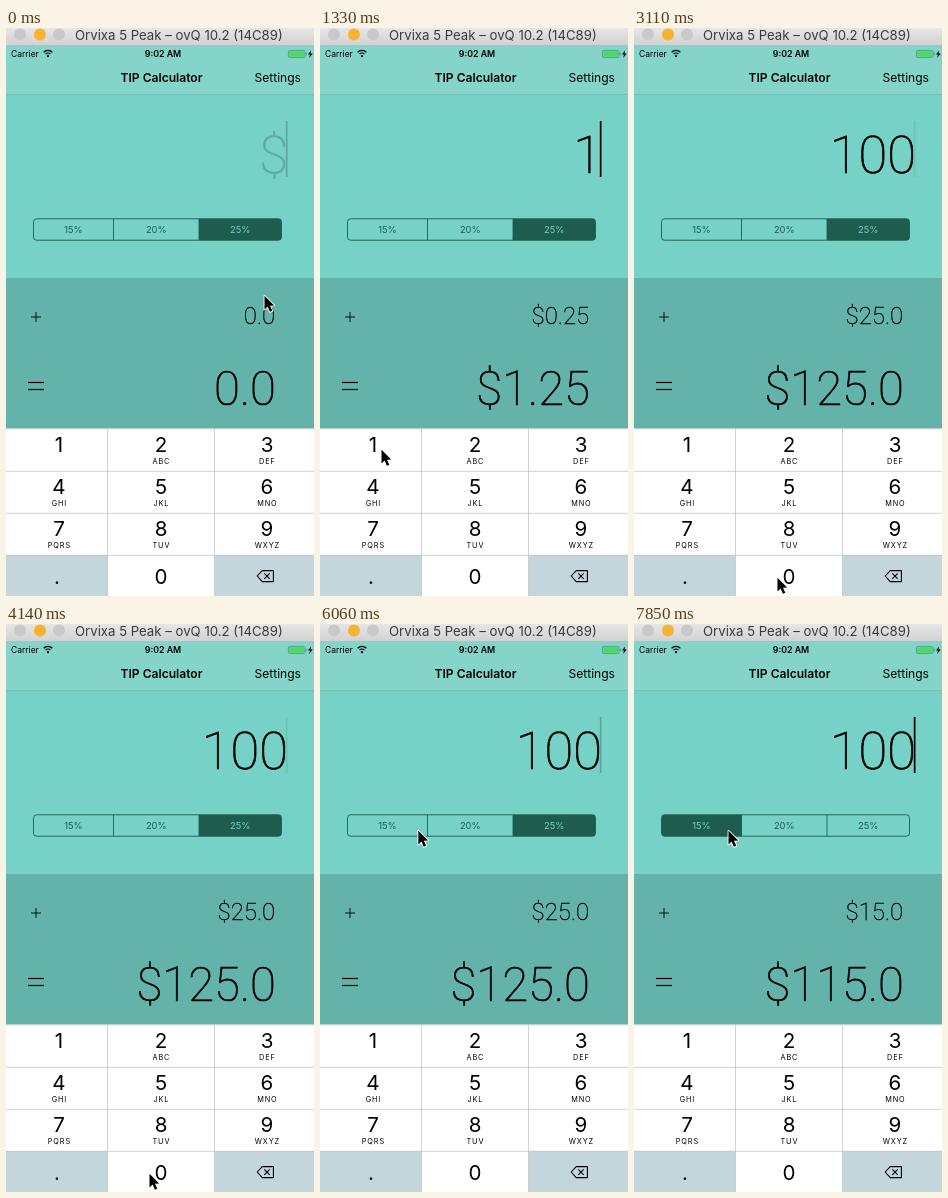
These frames come from a looping animation (308x568 px, 8000 ms). An HTML page with a canvas:

```html
<!DOCTYPE html>
<html lang="en">
<head>
<meta charset="utf-8">
<title>TIP Calculator</title>
<style>
  html, body { margin: 0; width: 100%; height: 100%; overflow: hidden; background: #76d2c7; }
  canvas { display: block; width: 308px; height: 568px; }
</style>
</head>
<body>
<canvas id="stage"></canvas>
<script>
const W = 308, H = 568, LOOP = 8000, STEP = 148.15;
const UI = 'Inter, "Open Sans", sans-serif';
const THIN = 'Roboto, Inter, sans-serif';
const INK = '#000', TEAL = '#76d2c7', LOW = '#64b3ab', DARK = '#1e5c4e', KEY = '#c2d6db';

const canvas = document.getElementById('stage');
const ctx = canvas.getContext('2d');
const dpr = window.devicePixelRatio || 1;
canvas.width = W * dpr;
canvas.height = H * dpr;

// time, x, y of the pointer tip
const PATH = [
  [130, 258, 267], [1040, 61, 421], [1333, 61, 421], [1900, 143, 549],
  [4740, 143, 549], [5037, 125, 230], [5620, 99, 206], [5926, 99, 206],
  [6700, 87, 206], [7700, 87, 206], [7852, 94, 206]
];
const COLS = [0, 101.5, 208.5, W];
const ROWS = [400.5, 443, 485, 527, H];
const CENTERS = [53, 155, 261];
const LETTERS = ['', 'ABC', 'DEF', 'GHI', 'JKL', 'MNO', 'PQRS', 'TUV', 'WXYZ'];
const SEGMENTS = [[27.5, 107.5, 15], [107.5, 193, 20], [193, 275.5, 25]];

function rect(x, y, w, h, fill) {
  ctx.fillStyle = fill;
  ctx.fillRect(x, y, w, h);
}

function disc(x, y, r, fill) {
  ctx.fillStyle = fill;
  ctx.beginPath();
  ctx.arc(x, y, r, 0, Math.PI * 2);
  ctx.fill();
}

function line(points, color, width) {
  ctx.strokeStyle = color;
  ctx.lineWidth = width;
  ctx.beginPath();
  points.forEach(([x, y], i) => i ? ctx.lineTo(x, y) : ctx.moveTo(x, y));
  ctx.stroke();
}

function shape(points) {
  ctx.beginPath();
  points.forEach(([x, y]) => ctx.lineTo(x, y));
  ctx.closePath();
}

function label(text, x, y, size, { align = 'center', color = INK, weight = 400, spacing = 0 } = {}) {
  ctx.font = `${weight} ${size}px ${UI}`;
  ctx.letterSpacing = spacing + 'px';
  ctx.textAlign = align;
  ctx.fillStyle = color;
  ctx.fillText(text, x, y);
  ctx.letterSpacing = '0px';
}

// hairline numerals, right aligned
function amount(text, x, y, size, color = INK) {
  ctx.font = `100 ${size}px ${THIN}`;
  ctx.textAlign = 'right';
  ctx.fillStyle = ctx.strokeStyle = color;
  ctx.lineWidth = size * 0.014;
  ctx.lineJoin = 'round';
  ctx.fillText(text, x, y);
  ctx.strokeText(text, x, y);
}

const money = v => '$' + (Number.isInteger(v) ? v.toFixed(1) : v);

function pointerAt(t) {
  const i = PATH.findIndex(p => p[0] > t);
  if (i === 0) return PATH[0].slice(1);
  if (i < 0) return PATH[PATH.length - 1].slice(1);
  const [t0, x0, y0] = PATH[i - 1], [t1, x1, y1] = PATH[i];
  const u = (t - t0) / (t1 - t0), e = u * u * (3 - 2 * u);
  return [x0 + (x1 - x0) * e, y0 + (y1 - y0) * e];
}

// blinking, held solid while typing
function caretAlpha(t) {
  if (t > 1150 && t < 2930) return 1;
  const p = (t < 1150 ? t + 130 : t - 2930) % 1005;
  if (p < 480) return Math.max(0.08, 1 - p / 165);
  return Math.min(1, 0.08 + (p - 480) / 120);
}

function drawTop() {
  const bar = ctx.createLinearGradient(0, 0, 0, 17);
  bar.addColorStop(0, '#e6e6e6');
  bar.addColorStop(1, '#d2d2d2');
  rect(0, 0, W, 17, bar);
  disc(14, 6.5, 6, '#c9c9c9');
  disc(34, 6.5, 6, '#f7b32d');
  disc(53, 6.5, 6, '#c9c9c9');
  label('Orvixa 5 Peak – ovQ 10.2 (14C89)', 69, 12.2, 13.2, { align: 'left', color: '#3b3b3b' });

  rect(0, 17, W, 49, '#84d4ca');
  rect(0, 66, W, 1, '#73c2b8');
  label('Carrier', 5, 28.8, 8.5, { align: 'left' });
  disc(42, 28.2, 1.1, INK);
  ctx.strokeStyle = INK;
  ctx.lineWidth = 1.3;
  for (const r of [3.5, 6.2]) {
    ctx.beginPath();
    ctx.arc(42, 28.6, r, -Math.PI * 0.75, -Math.PI * 0.25);
    ctx.stroke();
  }
  label('9:02 AM', 157, 28.8, 8.8, { weight: 600 });
  ctx.strokeStyle = '#3f8f7c';
  ctx.lineWidth = 0.7;
  ctx.beginPath();
  ctx.roundRect(282.4, 22.4, 16.6, 7.2, 1.5);
  ctx.stroke();
  rect(283.2, 23.2, 15, 5.6, '#4cd964');
  rect(299.6, 24.7, 1, 2.6, '#3f8f7c');
  shape([[305, 22.5], [302, 26.6], [304, 26.6], [303.2, 30], [306.6, 25.4], [304.5, 25.4]]);
  ctx.fillStyle = INK;
  ctx.fill();

  label('TIP Calculator', 155.5, 54, 12.1, { weight: 600 });
  label('Settings', 295, 54, 12.1, { align: 'right' });
}

function drawSegments(selected, pressed) {
  ctx.save();
  ctx.beginPath();
  ctx.roundRect(27.5, 190.8, 248, 21.4, 3);
  ctx.clip();
  for (const [a, b, pct] of SEGMENTS) {
    if (pct === selected) rect(a, 190, b - a, 23, DARK);
    else if (pct === pressed) rect(a, 190, b - a, 23, 'rgba(30,92,78,0.15)');
  }
  ctx.restore();
  ctx.strokeStyle = DARK;
  ctx.lineWidth = 0.9;
  ctx.beginPath();
  ctx.roundRect(27.5, 190.8, 248, 21.4, 3);
  ctx.stroke();
  for (const x of [107.5, 193]) line([[x, 191], [x, 212]], DARK, 0.9);
  for (const [a, b, pct] of SEGMENTS) {
    label(pct + '%', (a + b) / 2, 205, 9.3, { color: pct === selected ? TEAL : DARK });
  }
}

function drawKeys(pressed) {
  rect(0, ROWS[0], W, H - ROWS[0], '#fff');
  for (let i = 0; i < 12; i++) {
    const c = i % 3, r = Math.floor(i / 3);
    const shaded = i === 9 || i === 11 || i === pressed;
    if (shaded) rect(COLS[c], ROWS[r], COLS[c + 1] - COLS[c], ROWS[r + 1] - ROWS[r], KEY);
  }
  for (const y of ROWS.slice(0, 4)) line([[0, y + 0.3], [W, y + 0.3]], '#c3c7c9', 0.8);
  for (const x of COLS.slice(1, 3)) line([[x, 400], [x, H]], '#c3c7c9', 0.8);
  for (let i = 0; i < 9; i++) {
    const x = CENTERS[i % 3], y = 424 + Math.floor(i / 3) * 42.2;
    label(String(i + 1), x, y, 20.6);
    label(LETTERS[i], x + 0.4, y + 11.6, 7.3, { spacing: 0.9 });
  }
  label('0', 155, 555.5, 20.6);
  label('.', 51, 555.5, 20.6);

  shape([[251.2, 548], [256.2, 542.6], [267.4, 542.6], [267.4, 553.6], [256.2, 553.6]]);
  ctx.strokeStyle = INK;
  ctx.lineWidth = 1.1;
  ctx.lineJoin = 'round';
  ctx.stroke();
  line([[258.3, 545.4], [263.7, 550.8]], INK, 1.1);
  line([[263.7, 545.4], [258.3, 550.8]], INK, 1.1);
}

function drawPointer([x, y]) {
  ctx.save();
  ctx.translate(x + 0.5, y + 0.8);
  shape([[0, 0], [0, 13.6], [3.1, 10.8], [5.4, 16], [7.8, 15], [5.5, 9.9], [9.7, 9.6]]);
  ctx.lineJoin = 'round';
  ctx.strokeStyle = '#fff';
  ctx.lineWidth = 1.8;
  ctx.stroke();
  ctx.fillStyle = INK;
  ctx.fill();
  ctx.restore();
}

function draw(t) {
  const bill = t < 1320 ? '' : t < 2060 ? '1' : t < 2500 ? '10' : '100';
  const pct = t < 7390 ? 25 : 15;
  const key = t >= 1170 && t < 1320 ? 0
    : (t >= 1910 && t < 2060) || (t >= 2360 && t < 2500) ? 10 : -1;

  ctx.setTransform(dpr, 0, 0, dpr, 0, 0);
  rect(0, 0, W, H, TEAL);
  rect(0, 250, W, 151, LOW);
  drawTop();

  amount(bill || '$', 282, 145, 52.5, bill ? INK : '#5da9a1');
  ctx.globalAlpha = caretAlpha(t);
  rect(279.8, 93, 1.7, 56, INK);
  ctx.globalAlpha = 1;

  drawSegments(pct, t >= 7240 && t < 7390 ? 15 : 0);

  line([[25, 289], [35, 289]], INK, 0.9);
  line([[30, 284], [30, 294]], INK, 0.9);
  line([[22, 354.5], [38, 354.5]], INK, 1.2);
  line([[22, 361.5], [38, 361.5]], INK, 1.2);
  const n = Number(bill), tip = n * pct / 100;
  amount(bill ? money(tip) : '0.0', 269.2, 295.8, 24);
  amount(bill ? money(n + tip) : '0.0', 270, 376.5, 47.3);

  drawKeys(key);
  drawPointer(pointerAt(t));
}

const start = performance.now();
function tick() {
  const t = (performance.now() - start) % LOOP;
  draw(Math.min(53, Math.floor((t + 14) / STEP)) * STEP);
  requestAnimationFrame(tick);
}
tick();
</script>
</body>
</html>
```
